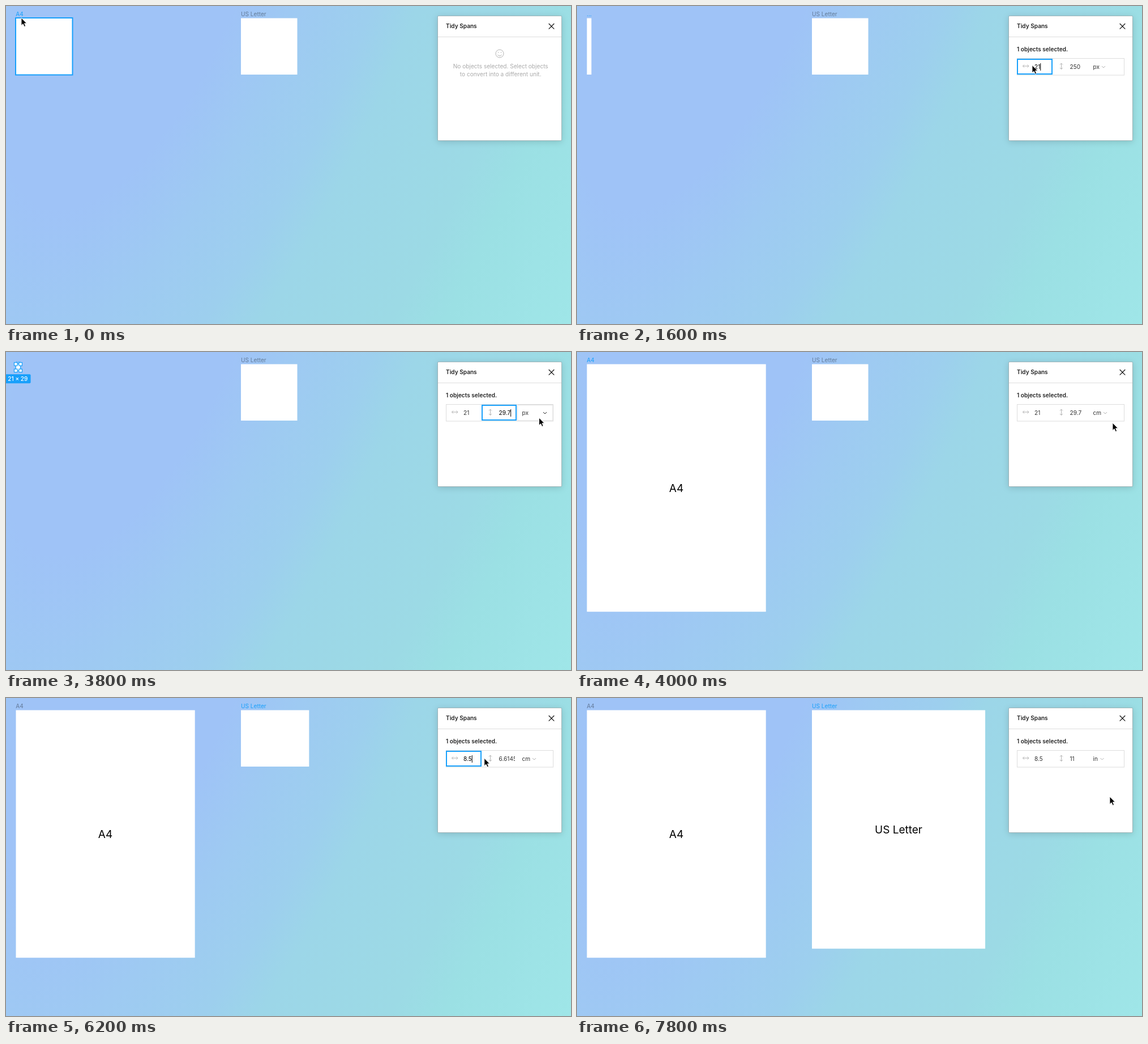
Animation of 998 by 561 pixels, one loop 8000 ms. Source, as an HTML page:

```html
<!DOCTYPE html>
<html lang="en">
<head>
<meta charset="utf-8">
<title>Unit converter demo</title>
<style>
html, body { margin: 0; width: 100%; height: 100%; overflow: hidden; }
svg { display: block; }
#stage { width: 998px; height: 561px; font: 10.1px Inter, sans-serif; }
.bold { font-weight: 600; }
.blue { fill: #18a0fb; }
.line { fill: none; stroke: #18a0fb; }
.icon { fill: none; stroke: #b3b3b3; }
.panel { fill: #fff; stroke: rgba(0, 0, 0, .22); filter: drop-shadow(0 2px 6px rgba(0, 0, 0, .15)); }
</style>
</head>
<body>
<svg id="stage" viewBox="0 0 998 561">
  <radialGradient id="sky" gradientUnits="userSpaceOnUse" cx="0" cy="0" r="1"
    gradientTransform="translate(233.6 -40) rotate(23.6) scale(946 2365)">
    <stop offset=".18" stop-color="#9fc3f7"/>
    <stop offset=".3" stop-color="#9ecaf2"/>
    <stop offset=".42" stop-color="#9dcfee"/>
    <stop offset=".5" stop-color="#9cd6e8"/>
    <stop offset=".7" stop-color="#9cdae5"/>
    <stop offset=".79" stop-color="#9be0e4"/>
    <stop offset="1" stop-color="#9fe6e8"/>
  </radialGradient>
  <rect width="998" height="561" fill="url(#sky)"/>
  <g id="scene"></g>
</svg>
<script>
const LOOP = 8000, STEP = 200, ZOOM = 0.3988;
const OUTLINE_DELAY = 600; // the selection outline hides while a size is edited
const UNITS = { px: 1, cm: 96 / 2.54, in: 96 };
const PAGES = [
  { name: 'A4', x: 17.3, cx: 175.5, cy: 240 },
  { name: 'US Letter', x: 415, cx: 568, cy: 232 }
];
const PAGE_Y = 21.3;
const scene = document.getElementById('scene');

// [time, changes]; later entries override earlier ones
const EVENTS = [
  [0, { hover: 0 }],
  [200, { page: 0, w: '250', h: '250', unit: 'px', hover: -1 }],
  [1000, { focus: 'w', beam: true }],
  [1400, { w: '2', beam: false }],
  [1600, { w: '21' }],
  [2200, { focus: 'h', beam: true }],
  [2600, { h: '2', beam: false }],
  [2800, { h: '29' }],
  [3000, { h: '29.' }],
  [3200, { h: '29.7' }],
  [3600, { overUnit: true }],
  [4000, { unit: 'cm', focus: '', overUnit: false }],
  [4400, { page: 1, w: '6.6145', h: '6.6145' }],
  [5000, { focus: 'w', beam: true }],
  [5400, { w: '8', beam: false }],
  [5600, { w: '8.' }],
  [5800, { w: '8.5' }],
  [6400, { focus: 'h', beam: true }],
  [6600, { h: '1', beam: false }],
  [6800, { h: '11' }],
  [7200, { overUnit: true }],
  [7800, { unit: 'in', focus: '', overUnit: false }]
];

const POINTER = [
  [0, 27, 21], [200, 27, 21], [1000, 804, 104.5], [1600, 804, 104.5], [2200, 867, 106.5],
  [3200, 867, 106.5], [3600, 937, 107], [4000, 946, 125], [4400, 430, 9],
  [5000, 815, 105], [5400, 804, 105], [5900, 804, 105], [6400, 867, 107], [6800, 867, 107],
  [7200, 937, 107], [7400, 937, 107], [7800, 941, 174], [LOOP, 941, 174]
];

function stateAt(time) {
  const s = { page: -1, hover: -1, focus: '', sizes: [{ w: 250, h: 250 }, { w: 250, h: 250 }] };
  let edited = -Infinity;
  for (const [at, change] of EVENTS) {
    if (at > time) break;
    Object.assign(s, change);
    if ('page' in change) {
      edited = -Infinity;
      continue;
    }
    // the page follows whole units only
    for (const side of ['w', 'h'])
      if (change[side] || change.unit) {
        s.sizes[s.page][side] = parseInt(s[side]) * UNITS[s.unit];
        edited = at;
      }
  }
  s.outline = time - edited >= OUTLINE_DELAY;
  return s;
}

function pointerAt(time) {
  const i = POINTER.findIndex(p => p[0] > time);
  const [t0, x0, y0] = POINTER[i - 1], [t1, x1, y1] = POINTER[i];
  const u = (time - t0) / (t1 - t0), e = u * u * (3 - 2 * u);
  return [x0 + (x1 - x0) * e, y0 + (y1 - y0) * e];
}

const rect = (x, y, w, h, attrs) => `<rect x="${x}" y="${y}" width="${w}" height="${h}" ${attrs}/>`;
const text = (x, y, str, attrs = '') => `<text x="${x}" y="${y}" ${attrs}>${str}</text>`;
const path = (d, attrs = 'class="icon"') => `<path d="${d}" ${attrs}/>`;

function drawSelection(x, y, w, h, size) {
  let out = rect(x, y, w, h, 'class="line" stroke-width="1.3"');
  for (const hx of [x, x + w])
    for (const hy of [y, y + h])
      out += rect(hx - 2.8, hy - 2.8, 5.6, 5.6, 'fill="#fff" stroke="#18a0fb" stroke-width="1.2"');
  const label = [size.w, size.h].map(v => +v.toFixed(2)).join(' × ');
  const badge = 9 + label.length * 5.2, mid = x + w / 2 - .6, top = y + h + 6.3;
  return out + rect(mid - badge / 2, top, badge, 16.2, 'rx="2" class="blue"') +
    text(mid, top + 11.8, label, 'fill="#fff" font-weight="500" text-anchor="middle"');
}

function drawPage({ x, name, cx, cy }, i, s) {
  const size = s.sizes[i], w = size.w * ZOOM, h = size.h * ZOOM;
  const active = s.page === i || s.hover === i;
  let out = text(x, 17.6, w < 30 ? '...' : name, active ? 'class="blue"' : 'fill="#000" fill-opacity=".38"');
  out += `<svg x="${x}" y="${PAGE_Y}" width="${w}" height="${h}">` +
    rect(0, 0, w, h, 'fill="#fff"') +
    text(cx - x, cy - PAGE_Y + 7, name, 'font-size="19" text-anchor="middle"') + '</svg>';
  if (s.hover === i) out += rect(x - .3, PAGE_Y - .3, w + .8, h + .8, 'class="line" stroke-width="2"');
  if (s.page === i && s.outline) out += drawSelection(x, PAGE_Y, w, h, size);
  return out;
}

function drawField(side, x, left, right, s) {
  const focused = s.focus === side;
  return (focused ? rect(left + 1, 94, right - left - 2, 26, 'class="line" stroke-width="2"') : '') +
    `<svg x="${x}" y="94" width="${right - x - 3}" height="26">` +
    text(0, 16.8, s[side], focused ? 'id="typed" fill="#000"' : 'fill="#333"') +
    (focused && !s.beam ? '<path id="caret" stroke="#000"/>' : '') + '</svg>';
}

function drawUnit(s) {
  const chevronX = s.overUnit ? 952 : { px: 930, cm: 933, in: 927.5 }[s.unit];
  return (s.overUnit ? rect(903.5, 93.5, 62.5, 27.5, 'rx="1" fill="#fff" stroke="#ddd"') : '') +
    text(911.5, 110.8, s.unit, 'fill="#333"') +
    path(`M${chevronX - 3} 106l3 3l3-3`, `fill="none" stroke="${s.overUnit ? '#222' : '#b3b3b3'}"`);
}

function drawPanel(s) {
  let out = rect(762.5, 17.5, 219, 220, 'rx="1.5" class="panel"') +
    path('M763 54.5H981', 'stroke="#ddd"') +
    text(777, 39.4, 'Tidy Spans', 'class="bold" fill="#222"') +
    path('M958.7 31l9.6 9.6m0-9.6l-9.6 9.6', 'stroke="#111" stroke-width="1.2"');
  if (s.page < 0)
    return out + '<circle cx="872" cy="84" r="7" class="icon"/>' +
      path('M868.3 86q3.7 4 7.4 0M869.5 81v1.6M874.5 81v1.6') +
      text(873.7, 109.8, 'No objects selected. Select objects', 'fill="#aaa" text-anchor="middle"') +
      text(873.7, 124.4, 'to convert into a different unit.', 'fill="#aaa" text-anchor="middle"');
  return out + text(777, 80.4, '1 objects selected.', 'class="bold" fill="#222"') +
    rect(777.5, 92.5, 189, 29.5, 'fill="none" stroke="#ddd"') +
    path('M787.5 106H798m-8-2.5l-2.5 2.5l2.5 2.5m5.5-5l2.5 2.5l-2.5 2.5') +
    path('M855.5 101v10.5m-2.5-8l2.5-2.5l2.5 2.5m-5 5.5l2.5 2.5l2.5-2.5') +
    drawField('w', 808, 777, 840, s) + drawField('h', 870.5, 840, 902, s) + drawUnit(s);
}

function drawPointer([x, y], beam) {
  const curve = 'M-3.3-7.3Q0-7.3 0-5V5Q0 7.3-3.3 7.3M3.3-7.3Q0-7.3 0-5M0 5Q0 7.3 3.3 7.3M-2 2H2';
  const shape = beam
    ? path(curve, 'fill="none" stroke="#fff" stroke-width="2.4"') + path(curve, 'fill="none" stroke="#000"')
    : path('M0 0V13.4L3.1 10.6L5.3 15.4L7.6 14.4L5.5 9.7H9.6Z', 'stroke="#fff" stroke-width=".9"');
  return `<g transform="translate(${x} ${y})">${shape}</g>`;
}

function render(time) {
  const s = stateAt(time);
  scene.innerHTML = PAGES.map((page, i) => drawPage(page, i, s)).join('') +
    drawPanel(s) + drawPointer(pointerAt(time), s.beam);
  const caret = document.getElementById('caret');
  if (caret) {
    const end = document.getElementById('typed').getComputedTextLength() + .5;
    caret.setAttribute('d', `M${end} 7V20`);
  }
}

let shown = -1;
function tick() {
  const time = Math.floor(performance.now() % LOOP / STEP) * STEP;
  if (time !== shown) render(shown = time);
  requestAnimationFrame(tick);
}
tick();
</script>
</body>
</html>
```
